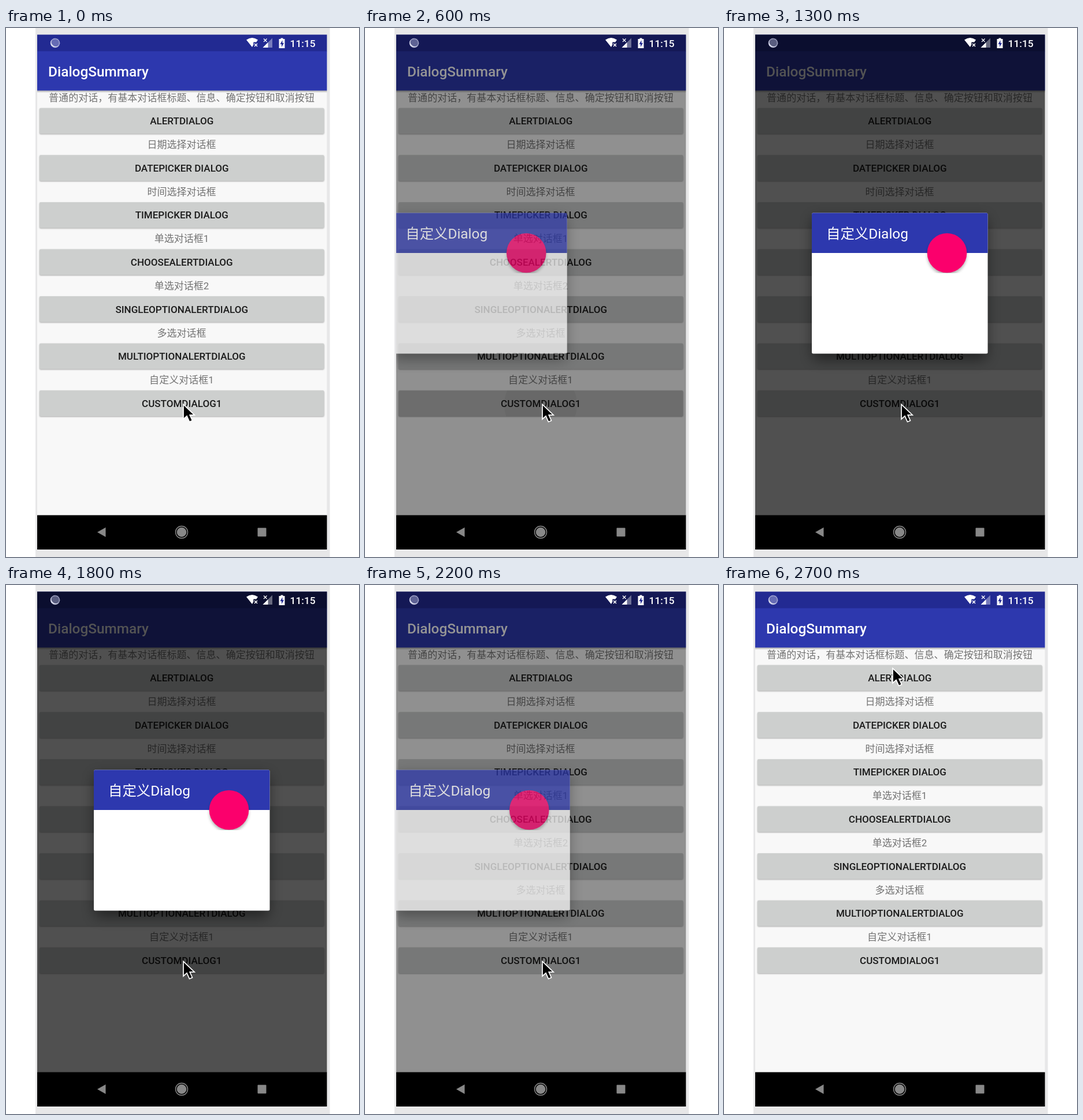
Animation of 611x917 px, one loop 2800 ms. Source, as an HTML page:

```html
<!DOCTYPE html>
<html lang="zh-CN">
<head>
<meta charset="utf-8">
<title>DialogSummary</title>
<style>
  html, body { margin: 0; width: 100%; height: 100%; overflow: hidden; background: #fff; }
  svg { display: block; width: 100%; height: 100%; }
  text { font-family: Roboto, "Noto Sans CJK SC", "Noto Sans CJK", sans-serif; font-size: 17.05px; }
  .mid { text-anchor: middle; }
  .label { fill: #737373; }
  .caps { fill: #1b1b1b; font-weight: 500; }
  .bar { fill: #fff; font-size: 24.4px; }
  .btn { fill: #cdcfce; filter: drop-shadow(0 1.5px 1.2px rgba(0, 0, 0, .32)); }
</style>
</head>
<body>
<svg viewBox="0 0 611 917" preserveAspectRatio="none">
  <defs>
    <clipPath id="screen"><rect x="54" y="11.5" width="501.5" height="892.5"/></clipPath>
    <clipPath id="lastBtn"><rect x="58" y="628.5" width="492.5" height="45" rx="2"/></clipPath>
    <clipPath id="fabBox"><rect x="340" y="350" width="92" height="75"/></clipPath>
    <filter id="soft" x="-20%" y="-50%" width="140%" height="200%"><feGaussianBlur stdDeviation="2.5"/></filter>
    <filter id="wide" x="-30%" y="-30%" width="160%" height="160%"><feGaussianBlur stdDeviation="12"/></filter>
    <linearGradient id="barShade" x2="0" y2="1">
      <stop stop-opacity=".3"/><stop offset="1" stop-opacity="0"/>
    </linearGradient>
  </defs>

  <rect x="51" width="509.5" height="917" fill="#e7e7e8"/>
  <g clip-path="url(#screen)">
    <rect x="54" y="11" width="502" height="893" fill="#f8f8f8"/>
    <g id="list"></g>
    <rect x="54" y="40" width="502" height="68.5" fill="#2d38ae"/>
    <rect x="54" y="108.5" width="502" height="4" fill="url(#barShade)"/>
    <text class="bar" x="73" y="84" font-weight="500">DialogSummary</text>
    <rect x="54" y="11" width="502" height="29.3" fill="#222a92"/>

    <rect id="dim" x="54" y="11" width="502" height="834" opacity="0"/>

    <g id="status" fill="#fff">
      <circle cx="85" cy="26" r="7.5" fill="#b9bcdf" fill-opacity=".45" stroke="#c9cbe6" stroke-width="1.6" stroke-dasharray="1.5 .8"/>
      <path d="M79 21a8 8 0 0 0 12 9.500a7 7 0 0 1-12-9.500z" fill="#dfe1f1"/>
      <path d="M416 20.500q10-7 20 0l-2.700 4h-5v4.500l-2.300 4z"/>
      <path d="M430 27l5 5m0-5l-5 5" stroke="#fff" stroke-width="1.500"/>
      <path d="M461 17.500v16.500h-16.500z" fill-opacity=".38"/>
      <path d="M453.500 25v9h-9z"/>
      <path d="M446 18.500l5.500 5.500m0-5.500l-5.500 5.500" stroke="#fff" stroke-width="1.300"/>
      <path d="M475.500 17.500h4v1.500h3v16h-10v-16h3z"/>
      <path d="M478.500 21l-4 7h2.500v5l4-7h-2.500z" fill="#222a92"/>
      <text x="491.500" y="32.500" font-weight="500" style="font-size:17.400px">11:15</text>
    </g>

    <g id="dialog" opacity="0">
      <rect x="154" y="330" width="300" height="244" fill-opacity=".5" filter="url(#wide)"/>
      <rect x="152" y="320.500" width="304.500" height="244" rx="2.500" fill="#fff"/>
      <path d="M152 390v-67q0-2.500 2.500-2.500h299.500q2.500 0 2.500 2.500v67z" fill="#2d38ae"/>
      <text class="bar" x="177" y="365">自定义Dialog</text>
      <g clip-path="url(#fabBox)">
        <circle cx="386" cy="394" r="34" fill-opacity=".3" filter="url(#soft)"/>
      </g>
      <circle cx="386" cy="390" r="34.300" fill="#fb006c"/>
    </g>

    <rect x="54" y="844.500" width="502" height="60"/>
    <g fill="#888">
      <path d="M158 874l14.500-8.300v16.600z"/>
      <circle cx="304" cy="874" r="8.300"/>
      <circle cx="304" cy="874" r="10.500" fill="none" stroke="#888" stroke-width="1.400"/>
      <rect x="435.500" y="866.500" width="15" height="15" rx="1"/>
    </g>
    <path id="cursor" d="M0 0v25.500l6-5.300 4.500 10 5-2.200-4.300-9.600h8z" stroke="#fff" stroke-width="1.700"/>
  </g>
</svg>
<script>
const rows = [
  ['普通的对话，有基本对话框标题、信息、确定按钮和取消按钮', 'ALERTDIALOG'],
  ['日期选择对话框', 'DATEPICKER DIALOG'],
  ['时间选择对话框', 'TIMEPICKER DIALOG'],
  ['单选对话框1', 'CHOOSEALERTDIALOG'],
  ['单选对话框2', 'SINGLEOPTIONALERTDIALOG'],
  ['多选对话框', 'MULTIOPTIONALERTDIALOG'],
  ['自定义对话框1', 'CUSTOMDIALOG1']
];
const LOOP = 2800, TICK = 100, SLIDE = 350, DIM = 0.675;
const $ = id => document.getElementById(id);

$('list').innerHTML = rows.map(([label, caps], i) => {
  const y = i * 81.6, last = i === rows.length - 1;
  return `<text class="label mid" x="304" y="${126.5 + y}">${label}</text>` +
    (last ? '<rect id="lift" x="58" y="632" width="492" height="45" filter="url(#soft)" opacity="0"/>' : '') +
    `<rect class="btn" x="58" y="${138.7 + y}" width="492.5" height="44.6" rx="2"/>` +
    (last ? '<g clip-path="url(#lastBtn)"><rect id="press" x="58" y="628" width="493" height="46" opacity="0"/>' +
      '<circle id="ripple" cx="304" cy="653" opacity="0"/></g>' : '') +
    `<text class="caps mid" x="304.3" y="${167.2 + y}">${caps}</text>`;
}).join('');

// Piecewise linear value from [time, value] stops.
function track(stops, t) {
  if (t <= stops[0][0]) return stops[0][1];
  for (let i = 1; i < stops.length; i++) {
    const [a, va] = stops[i - 1], [b, vb] = stops[i];
    if (t <= b) return va + (vb - va) * (t - a) / (b - a);
  }
  return stops[stops.length - 1][1];
}

// Accelerate then decelerate, 400 ms long.
const ease = (t, start) => {
  const p = Math.min(1, Math.max(0, (t - start) / 400));
  return (1 - Math.cos(Math.PI * p)) / 2;
};

const tracks = {
  dim: [[400, 0], [600, .62], [720, 1], [2050, 1], [2200, .62], [2420, 0]],
  lift: [[300, 0], [400, .28], [600, 0]],
  press: [[300, 0], [400, .03], [600, .09], [800, .03], [1000, 0]],
  ripple: [[300, 0], [400, .07], [600, .05], [800, .05], [1100, 0]],
  radius: [[300, 0], [400, 16], [600, 63], [800, 91], [1100, 110]],
  x: [[2400, 307], [2700, 292]],
  y: [[2400, 652.5], [2500, 540], [2600, 270], [2700, 144.5]]
};

function draw(t) {
  const at = name => track(tracks[name], t);
  const shown = ease(t, 349) - ease(t, 2055);
  $('dialog').setAttribute('opacity', shown);
  $('dialog').setAttribute('transform', `translate(${-SLIDE * (1 - shown)} 0)`);
  $('dim').setAttribute('opacity', DIM * at('dim'));
  for (const id of ['lift', 'press', 'ripple']) $(id).setAttribute('opacity', at(id));
  $('ripple').setAttribute('r', at('radius'));
  $('cursor').setAttribute('transform', `translate(${at('x')} ${at('y')})`);
}

const begin = performance.now();
function tick() {
  const t = (performance.now() - begin) % LOOP;
  draw(Math.floor(t / TICK) * TICK);
  requestAnimationFrame(tick);
}
tick();
</script>
</body>
</html>
```
